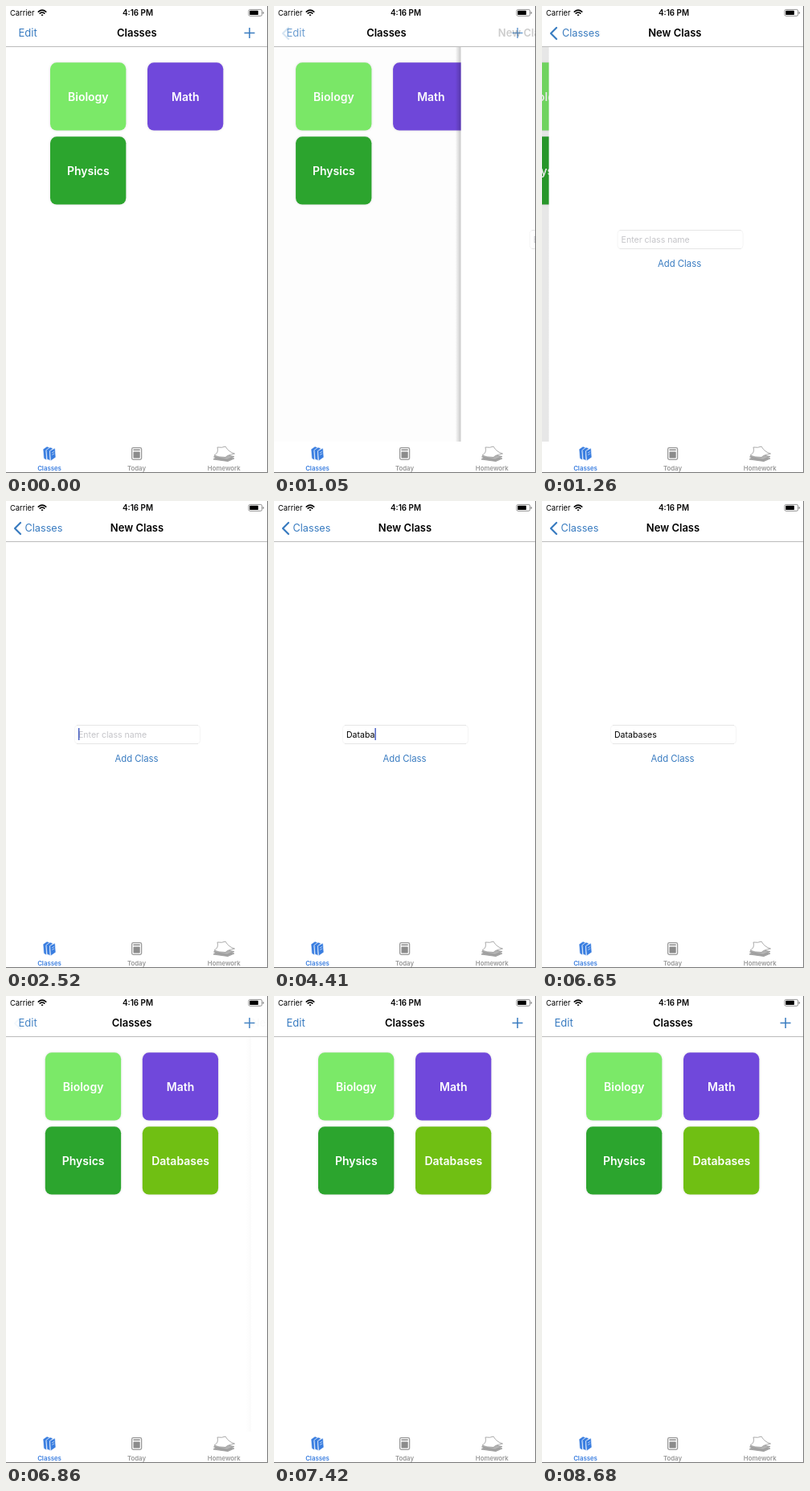
These frames come from a looping animation (326x580 px, 8.75 s). An HTML page:

```html
<!DOCTYPE html>
<html lang="en">
<head>
<meta charset="utf-8">
<title>Class planner</title>
<style>
  html, body { margin: 0; width: 100%; height: 100%; overflow: hidden; background: #fff; }
  svg { display: block; width: 326px; height: 580px; font: 13px Inter, "Liberation Sans", sans-serif; }
  .mid { text-anchor: middle; }
  .bold { font-weight: 600; }
  .blue { fill: #387bc0; }
  .card { font-size: 14px; fill: #fff; }
  .card rect { filter: drop-shadow(0 .5px 1.5px rgba(0, 0, 0, .14)); }
  .input { font-size: 10.55px; }
  .tab { font-size: 7.8px; fill: #999; }
  .line { fill: none; stroke-linecap: round; stroke-linejoin: round; }
</style>
</head>
<body>
<svg viewBox="0 0 326 580">
  <defs>
    <linearGradient id="edge">
      <stop offset="0" stop-opacity="0"/>
      <stop offset="1" stop-opacity=".22"/>
    </linearGradient>
  </defs>

  <rect width="326" height="580" fill="#fff"/>
  <g id="list"></g>
  <rect id="dim" y="51" width="326" height="490"/>

  <g id="form">
    <rect id="shadow" x="-7" y="51" width="7" height="490" fill="url(#edge)"/>
    <rect y="51" width="326" height="490" fill="#fff"/>
    <rect x="85.5" y="278.5" width="156" height="23" rx="4" fill="none" stroke="#f5f5f5"/>
    <path d="M88 278.5H239M88 301.5H239" stroke="#e6e6e6"/>
    <text id="hint" class="input" x="90" y="293.5" fill="#c4c4c8">Enter class name</text>
    <text id="typed" class="input" x="90" y="293.5"></text>
    <rect id="caret" y="282" width="1.4" height="15" fill="#4058c0"/>
    <text id="add" class="mid blue" x="162.5" y="324" font-size="11.3">Add Class</text>
  </g>

  <!-- status and navigation bars -->
  <rect width="326" height="51" fill="#fff"/>
  <path d="M0 50.5H326" stroke="#bcbcbc"/>
  <text x="5" y="12" font-size="9.3">Carrier</text>
  <text class="mid bold" x="164" y="12" font-size="9.8">4:16 PM</text>
  <g class="line" stroke="#000" stroke-width="1.6">
    <path d="M40.3 7.2Q45 3 49.7 7.2M42.2 9.2Q45 6.8 47.8 9.2"/>
    <path d="M44.5 11.2H45.5"/>
  </g>
  <rect x="301.9" y="4.4" width="16.6" height="8" rx="1.8" fill="none" stroke="#777" stroke-width=".8"/>
  <rect x="303.2" y="5.7" width="10.6" height="5.4" rx=".7"/>
  <path d="M319.6 7v3q1.4-.4 1.4-1.5T319.6 7" fill="#777"/>

  <g id="rootItems">
    <text class="blue" x="15.5" y="38.4">Edit</text>
    <path id="plus" d="M296.5 33.5H309.5M303 27V40" stroke="#387bc0" stroke-width="1.5"/>
  </g>
  <path id="chevron" class="line" d="M18 27L11 34L18 41" stroke="#387bc0" stroke-width="2.2"/>
  <text id="rootTitle" class="mid bold" x="162.8" y="38.4">Classes</text>
  <text id="back" class="blue" x="23.5" y="38.4" font-size="12.7">Classes</text>
  <text id="formTitle" class="mid bold" x="163" y="38.4">New Class</text>

  <!-- tab bar -->
  <rect y="541" width="326" height="39" fill="#fff"/>
  <g fill="#3a7ee0" stroke="#fff" stroke-width=".6" stroke-linejoin="round">
    <path d="M46 550.5l5-3.5 3.5 1.5-4.5 3.5 .5 12-3.5-2z"/>
    <path d="M50 551.5l5-3.5 3.5 1.5-4 3.5 .5 11.5-4-1.5z"/>
    <path d="M54.5 552.5l6.5-3.5 1 11.5-6.5 4.5z"/>
    <path d="M57 555l3-1.6M57.2 557.5l3-1.6" fill="none"/>
  </g>
  <rect x="156.6" y="548.6" width="12" height="14.8" rx="1.8" fill="#fff" stroke="#999" stroke-width="1.3"/>
  <path d="M158.5 551.3h8.2" stroke="#888" stroke-width="1.5"/>
  <rect x="158.5" y="553.4" width="8.2" height="8" rx=".6" fill="#8c8c8c"/>
  <g fill="#fff" stroke="#969696" stroke-width=".8" stroke-linejoin="round">
    <path d="M258 563l6-4 20 3-8 3.5z" fill="#a4a4a4"/>
    <path d="M258.5 560l7-4 18.5 3.5-9 4z" fill="#b4b4b4"/>
    <path d="M263 548q6 1 10-1 4 7 11.5 9-8 1-11.5 4.5-9 0-14-2.5 6-3 4-10z"/>
  </g>
  <g class="tab mid bold">
    <text x="54" y="577" fill="#3a7ee0">Classes</text>
    <text x="162.5" y="577">Today</text>
    <text x="271.3" y="577">Homework</text>
  </g>
  <path d="M325.5 0V579.5H0" fill="none" stroke="#777"/>
</svg>

<script>
const LOOP = 8750, STEP = 70;
const $ = id => document.getElementById(id);
const clamp = v => Math.max(0, Math.min(1, v));
const shift = (id, x) => $(id).setAttribute('transform', `translate(${x} 0)`);
const fade = (id, v) => $(id).setAttribute('opacity', clamp(v));

const cards = [
  ['Biology', '#7be968'], ['Math', '#7048db'],
  ['Physics', '#2ca52e'], ['Databases', '#70bf13']
];
$('list').innerHTML = cards.map(([name, color], i) => {
  const x = 55 + i % 2 * 121, y = 70.3 + (i >> 1) * 92;
  return `<g class="card mid bold" id="${name}">
    <rect x="${x}" y="${y}" width="94.3" height="84.2" rx="8" fill="${color}"/>
    <text x="${x + 47.3}" y="${y + 47.2}">${name}</text></g>`;
}).join('');

const word = 'Databases', focus = 2520;
const keys = [2870, 3220, 3360, 3500, 4270, 4410, 5110, 5320, 5530];

// Critically damped spring from 0 to 1; rate is per millisecond.
function spring(ms, rate) {
  const x = Math.max(0, ms) * rate;
  return 1 - (1 + x) * Math.exp(-x);
}

function draw(t) {
  const page = spring(t - 1000, .0212) - spring(t - 6650, .0212);
  const bar = spring(t - 1019, .0265) - spring(t - 6685, .0265);

  shift('list', -97.5 * page);
  shift('form', 326 * (1 - page));
  fade('dim', .1 * page * page);
  fade('shadow', 24 * (page * (1 - page)) ** 2);
  fade('Databases', t >= 6510 ? 1 : 0);

  fade('rootItems', 1 - 1.3 * bar);
  fade('plus', t >= 840 && t < 980 ? .4 : 1);
  fade('chevron', bar);
  shift('rootTitle', -115 * bar);
  shift('back', 115 * (1 - bar));
  fade('rootTitle', 2 - 2 * bar);
  fade('back', 2 * bar - 1);
  shift('formTitle', 186 * (1 - bar));
  fade('formTitle', 5 * bar * bar);

  const count = keys.filter(k => t >= k).length;
  const idle = t - (count ? keys[count - 1] : focus);
  $('typed').textContent = word.slice(0, count);
  fade('hint', count ? 0 : 1);
  $('caret').setAttribute('x', 90 + (count ? $('typed').getComputedTextLength() : 0));
  fade('caret', t < focus ? 0 : 1 - (idle - 600) / 140);
  fade('add', t >= 6510 && t < 6650 ? .35 : 1);
}

const start = performance.now();
function tick() {
  const t = (performance.now() - start) % LOOP;
  draw(Math.floor(t / STEP) * STEP);
  requestAnimationFrame(tick);
}
tick();
</script>
</body>
</html>
```
